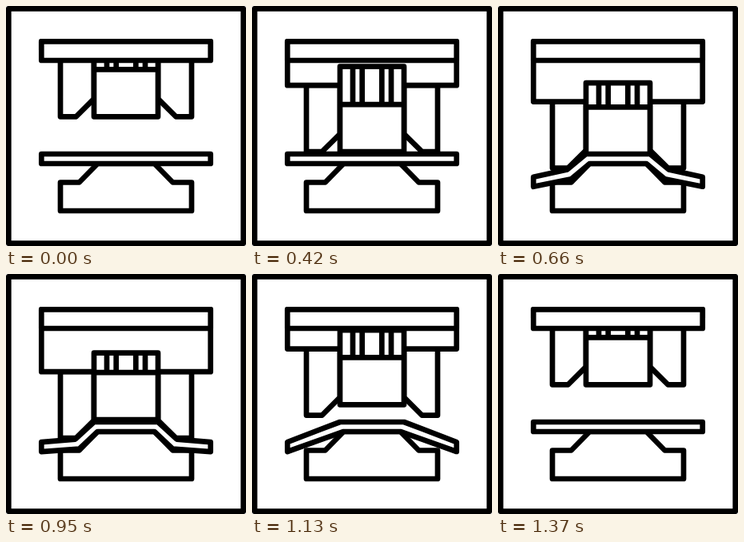
An HTML page for the animation above (1900 ms loop, 300 px wide and 300 px high).

```html
<!DOCTYPE html>
<html lang="en">
<head>
<meta charset="utf-8">
<title>Press forming</title>
<style>
  html, body { margin: 0; width: 100%; height: 100%; overflow: hidden; background: #fff; }
  svg { display: block; width: 100vw; height: 100vh; }
  path { fill: #fff; stroke: #000; stroke-width: 6.7; stroke-linejoin: round; stroke-linecap: round; }
</style>
</head>
<body>
<svg viewBox="0 0 300 300">
  <path d="M3.3 3.3H296.7V296.7H3.3Z"/>
  <path d="M68 220.5H91.5L114.5 197H185.5L208.5 220.5H232V256H68Z"/>
  <path id="legs"/>
  <path id="ram"/>
  <path id="pad"/>
  <path id="sheet"/>
  <path d="M44.3 44.3H255.7V68H44.3Z"/>
</svg>
<script>
const LOOP = 1900, STEP = 30, OPEN = 920;

// Each track is a list of [time in ms, value], linear in between.
const ramDrop = [[0, 0], [450, 47], [750, 71.7], [OPEN, 71.7], [1370, 0]];
const padDrop = [[0, 0], [450, 47], [OPEN, 47], [1370, 0]];
const endDrop = [[450, 0], [570, 35.5], [750, 22], [OPEN, 22], [1040, 34.4], [1370, 0]];
const fold = [[570, 0], [750, 1], [OPEN, 1], [1040, 0]];

const lerp = (a, b, k) => a + (b - a) * k;
const easeOut = k => k * (2 - k);

function at(track, t) {
  const i = track.findIndex(key => key[0] > t);
  if (i < 0) return track[track.length - 1][1];
  if (i === 0) return track[0][1];
  const [t0, a] = track[i - 1], [t1, b] = track[i];
  return lerp(a, b, (t - t0) / (t1 - t0));
}

const line = points => 'M' + points.map(p => p.join(' ')).join('L');
const mirror = points => points.map(([x, y]) => [300 - x, y]).reverse();
const draw = (id, d) => document.getElementById(id).setAttribute('d', d);

function sheetEdge(y, bendX, kneeX, kneeY, drop, k) {
  const straight = y + drop * (bendX - kneeX) / (bendX - 44.3);
  const left = [[44.3, y + drop], [kneeX, lerp(straight, kneeY, k)], [bendX, y]];
  return [...left, ...mirror(left)];
}

function render(t) {
  const ram = at(ramDrop, t), low = 138.3 + at(padDrop, t);
  const leg = [[68, 55 + ram], [68, 138.3 + ram], [87.5, 138.3 + ram], [110, 116 + ram], [110, 55 + ram]];
  draw('legs', line(leg) + 'Z' + line(mirror(leg)) + 'Z');
  draw('ram', `M44.3 44.3H255.7V${55.3 + ram}H44.3Z`);

  // The pocket never shows above the fixed top plate.
  const top = Math.max(56, 31.8 + ram), mid = low - 59;
  const pins = [126, 137.7, 162.3, 174].map(x => `M${x} ${top}V${mid}`).join('');
  draw('pad', `M110 ${top}H190V${low}H110ZM110 ${mid}H190` + pins);

  const drop = at(endDrop, t), k = easeOut(at(fold, t));
  const upper = sheetEdge(185, 110, 86.5, 207.5, drop, k);
  const lower = sheetEdge(197, 114.5, 91.5, 219.5, drop, k);
  draw('sheet', line([...upper, ...lower.reverse()]) + 'Z');
}

const start = performance.now();

function frame() {
  const t = (performance.now() - start) % LOOP, base = t < OPEN ? 0 : OPEN;
  render(base + Math.floor((t - base) / STEP) * STEP);
  requestAnimationFrame(frame);
}
frame();
</script>
</body>
</html>
```
